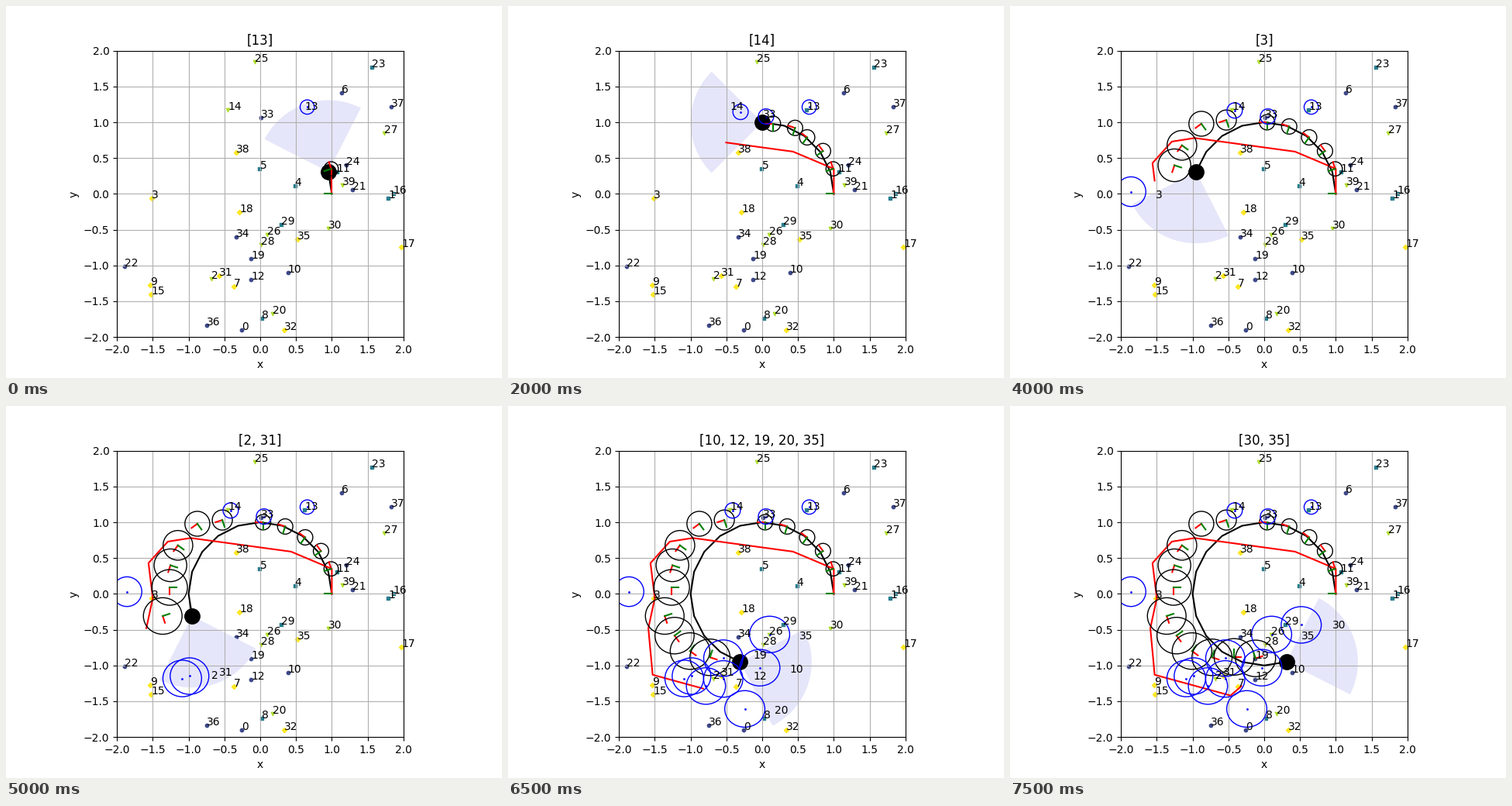
A matplotlib script that plays this animation: 640 px wide and 480 px high, repeating every 8000 ms.

```python
import numpy as np
import matplotlib.pyplot as plt
from matplotlib.animation import FuncAnimation
from matplotlib.patches import Ellipse, Wedge

STEPS, TURN = 16, 18
RANGE, HALF_FOV = 1.0, 45
REFINED = 5  # step at which the early estimates settle

# marker and position on the colour map, by order of first appearance
STYLES = [("o", .22), ("s", .42), ("v", .88), ("D", 1.0)]

# key points: step, x, y
ODOMETRY = np.array([
    (0, 1, 0), (1, 1, .35), (3, .43, .59), (6, -.97, .78), (7, -1.29, .73),
    (8, -1.56, .43), (10, -1.50, -.06), (11, -1.59, -.48),
    (12, -1.53, -1.13), (15, -.47, -1.42), (16, -.32, -1.29)])
DRIFT = np.array([
    (0, .04, .04), (2, .04, -.02), (4, .04, 0), (5, -.22, .08),
    (6, -.29, .17), (7, -.34, .09), (9, -.265, .09), (10, -.41, 0),
    (12, -.42, .01), (14, -.42, .12), (15, -.43, .05)])


def make_landmarks(count=40, seed=2):
    rng = np.random.RandomState(seed)
    spots, kinds = [], []
    for _ in range(count):
        spots.append(rng.uniform(-2, 2, 2))
        kinds.append(int(rng.randint(4)))
    order = list(dict.fromkeys(kinds))
    return np.array(spots), [STYLES[order.index(kind)] for kind in kinds]


def unit(deg):
    a = np.radians(deg)
    return np.array([np.cos(a), np.sin(a)])


def along(keys, step):
    t, x, y = keys.T
    return np.array([np.interp(step, t, x), np.interp(step, t, y)])


def heading(k):
    return 90 + TURN * (k + 1)


def drift(i, k):
    """Error at step k of whatever was first placed at step i."""
    shift = along(DRIFT, i)
    if k < REFINED and i >= 3:
        shift = shift + (.11, -.02)
    return shift


def radii(i):
    r = np.interp(i, [0, 1, 4, 7, 10, 13], [.1, .107, .107, .207, .27, .28])
    return r, min(r, .255)


def visible(k):
    d = LANDMARKS - TRUE[k + 1]
    angle = np.degrees(np.arctan2(d[:, 1], d[:, 0])) - heading(k)
    off = np.abs((angle + 180) % 360 - 180)
    near = np.hypot(d[:, 0], d[:, 1]) <= RANGE
    return [int(i) for i in np.flatnonzero(near & (off <= HALF_FOV))]


LANDMARKS, LOOKS = make_landmarks()
TRUE = np.array([unit(TURN * i) for i in range(STEPS + 1)])
DEAD_RECKONED = along(ODOMETRY, np.arange(STEPS + 1))
SEEN = [visible(k) for k in range(STEPS)]
FIRST_SEEN = {}
for step, ids in enumerate(SEEN):
    for i in ids:
        FIRST_SEEN.setdefault(i, step)

fig = plt.figure(figsize=(6.4, 4.8), dpi=100)
ax = fig.add_subplot()


def draw_landmarks():
    for i, ((x, y), (marker, level)) in enumerate(zip(LANDMARKS, LOOKS)):
        ax.scatter(x, y, s=10, marker=marker, color=plt.cm.viridis(level))
        ax.text(x, y, str(i))


def draw_axes(xy, deg):
    for turn, color in ((0, "red"), (90, "green")):
        tip = xy + .1 * unit(deg + turn)
        ax.plot([xy[0], tip[0]], [xy[1], tip[1]], color=color)


def draw_ellipse(xy, i, color):
    rx, ry = radii(i)
    ax.add_patch(Ellipse(xy, 2 * rx, 2 * ry, fill=False, ec=color, lw=1,
                         zorder=2))


def draw(k):
    ax.clear()
    robot = TRUE[k + 1]

    draw_landmarks()
    ax.add_patch(Wedge(robot, RANGE, heading(k) - HALF_FOV,
                       heading(k) + HALF_FOV, fc="lavender", lw=0))
    ax.plot(*robot, "o", color="black", ms=14)
    ax.plot(*TRUE[:k + 2].T, color="black")
    ax.plot(*DEAD_RECKONED[:, :k + 2], color="red")

    draw_axes(TRUE[0], 90)
    for i in range(k + 1):
        xy = TRUE[i + 1] + drift(i, k)
        draw_ellipse(xy, i, "black")
        draw_axes(xy, heading(i))

    for i, first in FIRST_SEEN.items():
        if first <= k:
            xy = LANDMARKS[i] + drift(first, k)
            draw_ellipse(xy, first, "blue")
            ax.plot(*xy, "o", color="blue", ms=1)

    ax.set(xlim=(-2, 2), ylim=(-2, 2), aspect="equal",
           xlabel="x", ylabel="y", title=str(SEEN[k]))
    ax.grid(True)
    return []


anim = FuncAnimation(fig, draw, frames=STEPS, interval=500,
                     init_func=lambda: [], repeat=True, repeat_delay=0)
plt.show()
```
